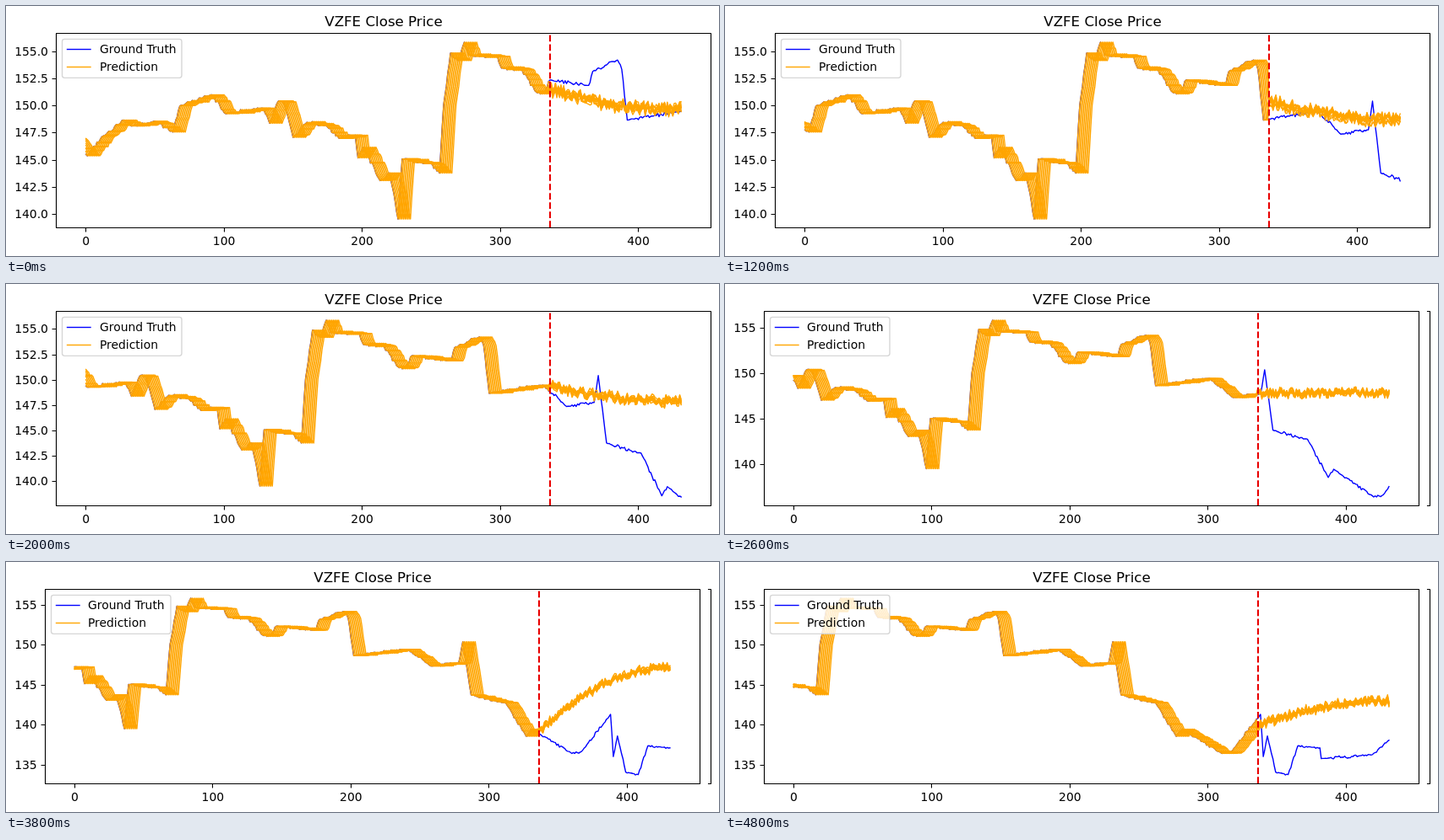
An HTML page for the animation above (5000 ms loop, 844 px wide and 297 px high).

```html
<!DOCTYPE html>
<html lang="en">
<head>
<meta charset="utf-8">
<title>Close price forecast</title>
<style>
  html, body { margin: 0; width: 100%; height: 100%; overflow: hidden; background: #fff; }
  svg { display: block; width: 844px; height: 297px; font-family: "DejaVu Sans", sans-serif; font-size: 13.89px; }
  path { fill: none; stroke-width: 1.39; stroke-linejoin: round; stroke-linecap: square; }
  .axis { stroke: #000; stroke-width: 1.11; }
  .truth { stroke: #00f; }
  .pred { stroke: #ffa500; }
  .now { stroke: #e80000; stroke-width: 2.08; stroke-dasharray: 7.71 3.33; stroke-linecap: butt; }
  .box { fill: #fff; fill-opacity: .8; stroke: #ccc; stroke-opacity: .8; stroke-width: 1.39; }
</style>
</head>
<body>
<svg id="chart" viewBox="0 0 844 297"></svg>
<script>
const STEP_MS = 200, STEPS = 25, SHIFT = 10;
const PAST = 336, AHEAD = 96, SPAN = PAST + AHEAD, COPIES = 10, LEAD = COPIES - 1;
const TOP = 32.5, BOTTOM = 263.5, WIDTH = 775;
const UNIT = WIDTH / 1.1 / (SPAN - 1);

// Main turning points of the price: [sample, price]
const turns = [
  [-9, 147], [1, 145.4], [12, 147.2], [27, 148.7], [33, 148.15], [50, 148.6], [63, 147.6],
  [68, 150], [91, 151.05], [101, 149.3], [128, 149.8], [133, 148.4], [139, 150.4], [143, 150.4],
  [150, 147.1], [160, 148.5], [174, 148.2], [184, 147], [195, 147.3], [197, 145.2], [201, 146.2],
  [213, 143.1], [220, 143.8], [226, 139.56], [229, 145.1], [250, 144.7], [256, 143.8], [259, 150.1],
  [264, 154.9], [270, 154.2], [274, 155.9], [277, 154.7], [298, 154.6], [301, 153.5], [315, 153.4],
  [326, 151.3], [332, 151.3], [336, 152.4], [364, 151.9], [367, 153.2], [385, 154.25], [388, 153.4],
  [392, 148.7], [431, 149.5], [448, 147.4], [468, 147.8], [471, 150.45], [477, 143.8], [502, 142.8],
  [517, 138.6], [521, 139.5], [550, 136.45], [557, 136.7], [578, 141.35], [580, 136.06], [583, 138.65],
  [589, 134.1], [598, 133.8], [605, 137.4], [621, 137.15], [622, 135.8], [659, 136.3], [671, 138.1]
];
// Level each forecast settles at: [step, price]
const goals = [[0, 149.6], [4, 149.6], [8, 147.8], [13, 147.8], [16, 148.2], [19, 147.3], [24, 143]];

const mix = (a, b, t) => a + (b - a) * t;

// Seeded noise in -1..1
const noise = (a, b) => {
  const s = Math.sin(a * 12.9898 + b * 78.233) * 43758.5453;
  return (s - Math.floor(s)) * 2 - 1;
};

// Straight lines between points, roughened away from the points
function along(points, x, rough = 0) {
  let i = 1;
  while (i < points.length - 1 && points[i][0] < x) i++;
  const [x0, y0] = points[i - 1], [x1, y1] = points[i];
  const t = (x - x0) / (x1 - x0);
  return mix(y0, y1, t) + rough * Math.min(1, 4 * t * (1 - t)) * noise(x, 3);
}

const series = Array.from({ length: LEAD + SPAN + (STEPS - 1) * SHIFT }, (_, i) => along(turns, i - LEAD, 0.2));
const truth = g => series[g + LEAD];

// Each forecast eases from the recent mean to its goal
function forecast(n) {
  const now = PAST + n * SHIFT + LEAD;
  const recent = series.slice(now - LEAD, now + 1);
  const start = recent.reduce((a, b) => a + b) / recent.length;
  const goal = along(goals, n);
  return i => mix(start, goal, 1 - (1 - i / AHEAD) ** 2) + 0.35 * noise(n + 1, i);
}

const snap = v => Math.floor(v) + 0.5;
const path = (cls, d) => `<path class="${cls}" d="${d}"/>`;
const text = (x, y, s, anchor = "start", size = 13.89) =>
  `<text x="${x}" y="${y}" text-anchor="${anchor}" font-size="${size}">${s}</text>`;

function draw(n) {
  const from = n * SHIFT;
  const seen = series.slice(from, from + SPAN + LEAD);
  const lo = Math.min(...seen), hi = Math.max(...seen);
  const range = (hi - lo) * 1.1, top = hi + (hi - lo) * 0.05;
  const wide = range < 19.7;
  const tick = wide ? 2.5 : 5;
  const edge = wide ? 59.4 : 46.15;
  const left = snap(edge), right = left + WIDTH;
  const X = x => edge + WIDTH / 22 + x * UNIT;
  const Y = v => TOP + (top - v) * (BOTTOM - TOP) / range;
  const line = f => {
    let d = "";
    for (let x = 0; x < SPAN; x++) d += (x ? "L" : "M") + X(x).toFixed(2) + " " + Y(f(x)).toFixed(2);
    return d;
  };

  let out = path("truth", line(x => truth(from + x)));
  const level = forecast(n);
  for (let k = 0; k < COPIES; k++) {
    const bias = 0.35 * noise(n + 5, k + 40);
    out += path("pred", line(x => {
      const i = x - PAST;
      return i < 0 ? truth(from + x - k) : level(i) + bias + 0.2 * noise(n * 17 + k, i + 500);
    }));
  }
  out += path("now", `M${Math.round(X(PAST))} 263V32`);

  let axes = `M${left} ${TOP}H${right}V${BOTTOM}H${left}Z`;
  for (let x = 0; x <= 400; x += 100) {
    axes += `M${snap(X(x))} ${BOTTOM}v4.4`;
    out += text(X(x), 284, x, "middle");
  }
  for (let v = Math.ceil((top - range) / tick) * tick; v < top; v += tick) {
    const y = snap(Y(v));
    axes += `M${left} ${y}h-4.4`;
    out += text(edge - 9.5, y + 4.5, v.toFixed(wide ? 1 : 0), "end");
  }
  // The narrower picture leaves the old right edge standing
  if (!wide) axes += `M831.5 ${TOP}H834.5V${BOTTOM}H831.5`;
  out += path("axis", axes);

  out += text(left + WIDTH / 2, 24, "VZFE Close Price", "middle", 16.67);
  out += `<rect class="box" x="${left + 7}" y="39.4" width="141.5" height="46" rx="2.8"/>`;
  [["truth", "Ground Truth"], ["pred", "Prediction"]].forEach(([cls, name], i) => {
    out += path(cls, `M${left + 13} ${51.5 + i * 21}h27.5`);
    out += text(Math.floor(edge + 51.7), 56 + i * 21, name);
  });
  return out;
}

const chart = document.getElementById("chart");
let shown = -1;
function play() {
  const n = Math.floor(performance.now() / STEP_MS) % STEPS;
  if (n !== shown) chart.innerHTML = draw(shown = n);
  requestAnimationFrame(play);
}
play();
</script>
</body>
</html>
```
